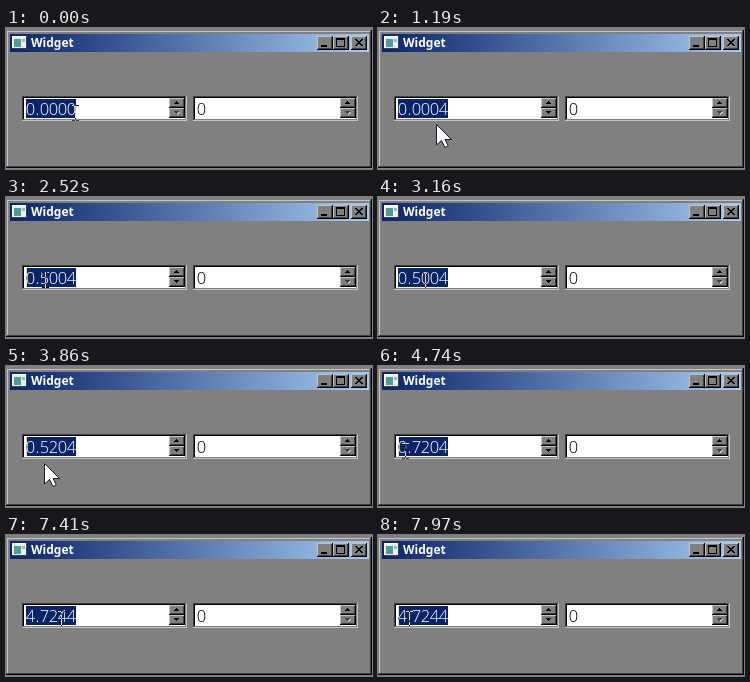
These frames come from a looping animation (366x141 px, 8000 ms). An HTML page with a canvas:

```html
<!DOCTYPE html>
<html lang="en">
<head>
<meta charset="utf-8">
<title>Widget</title>
<style>
html, body { margin: 0; width: 100%; height: 100%; overflow: hidden; background: #808080; }
canvas { display: block; }
</style>
</head>
<body>
<canvas id="stage" width="366" height="141"></canvas>
<script>
const ctx = document.getElementById('stage').getContext('2d');
const LOOP = 8000, TICK = 78.85;
const FACE = '#808080', LIGHT = '#c4c4c4', SHADOW = '#404040', BLACK = '#000', NAVY = '#0a246a';

// Pointer path: tick, x, y; linear in between.
const path = [
  [12, 69, 85], [13, 67, 89], [14, 63, 98], [15, 58, 96], [18, 46, 94], [20, 40, 86], [21, 39, 83],
  [33, 39, 83], [35, 43, 93], [37, 48, 94], [40, 47, 84],
  [46, 47, 84], [48, 40, 93], [49, 38, 97], [50, 36, 102], [52, 32, 98], [54, 29, 88], [55, 27, 85],
  [62, 27, 85], [64, 22, 84], [66, 22, 84], [67, 23, 85],
  [79, 23, 85], [80, 41, 85], [82, 53, 85], [83, 55, 84],
  [95, 55, 84], [97, 43, 98], [99, 34, 94], [101, 31, 84]
];

// Ticks at which the wheel raises each digit by one; '.' stays in place.
const wheel = [
  [68, 69, 75, 76], null, [24, 25, 29, 30, 32, 59, 60], [42, 43], [86, 87, 93, 94], [2, 3, 9, 10]
];

function rect(x, y, w, h, color) {
  ctx.fillStyle = color;
  ctx.fillRect(x, y, w, h);
}

function bevel(x, y, w, h, topLeft, bottomRight) {
  rect(x, y, w, 1, topLeft);
  rect(x, y, 1, h, topLeft);
  rect(x, y + h - 1, w, 1, bottomRight);
  rect(x + w - 1, y, 1, h, bottomRight);
}

function button(x, y, w, h) {
  rect(x, y, w, h, FACE);
  bevel(x, y, w, h, LIGHT, BLACK);
  rect(x + 1, y + h - 2, w - 2, 1, SHADOW);
  rect(x + w - 2, y + 1, 1, h - 2, SHADOW);
}

function triangle(x, y, up, color) {
  for (let i = 0; i < 3; i++) rect(x + i, up ? y + 2 - i : y + i, 5 - 2 * i, 1, color);
}

function text(str, x, y, font, color) {
  ctx.font = font;
  ctx.fillStyle = color;
  ctx.fillText(str, x, y);
}

function number(str, x, color) {
  ctx.textAlign = 'center';
  for (const ch of str) {
    const advance = ch === '.' ? 5 : 9;
    text(ch, x + advance / 2, 87, '300 16.5px "Open Sans", "Noto Sans", sans-serif', color);
    x += advance;
  }
  ctx.textAlign = 'left';
}

function spinBox(x, canStepDown) {
  rect(x, 68, 165, 25, '#fff');
  bevel(x, 68, 165, 25, SHADOW, LIGHT);
  bevel(x + 1, 69, 163, 23, BLACK, FACE);
  button(x + 147, 70, 16, 10);
  button(x + 147, 80, 16, 10);
  triangle(x + 152, 73, true, BLACK);
  if (!canStepDown) triangle(x + 153, 84, false, LIGHT);
  triangle(x + 152, 83, false, canStepDown ? BLACK : SHADOW);
}

function titleBar() {
  const fade = ctx.createLinearGradient(4, 0, 363, 0);
  fade.addColorStop(0, NAVY);
  fade.addColorStop(1, '#a6caf0');
  rect(4, 6, 359, 18, fade);

  rect(6, 8, 15, 13, '#e8f0f0');
  bevel(6, 8, 15, 13, '#fff', SHADOW);
  rect(8, 11, 7, 8, '#4f9a9a');
  rect(16, 11, 3, 3, '#9ab8c8');

  text('Widget', 25, 19, 'bold 12px "Noto Sans", "Open Sans", sans-serif', '#fff');

  for (const x of [311, 327, 345]) button(x, 8, 16, 14);
  rect(315, 17, 6, 2, BLACK);
  bevel(330, 10, 9, 9, BLACK, BLACK);
  rect(330, 11, 9, 1, BLACK);
  for (let i = 0; i < 7; i++) {
    rect(349 + i, 11 + i, 2, 1, BLACK);
    rect(355 - i, 11 + i, 2, 1, BLACK);
  }
}

function invert(...rects) {
  ctx.globalCompositeOperation = 'difference';
  for (const r of rects) rect(...r, '#fff');
  ctx.globalCompositeOperation = 'source-over';
}

function pointerAt(tick) {
  const next = path.findIndex(p => p[0] >= tick);
  if (next < 1) return path[next < 0 ? path.length - 1 : 0].slice(1);
  const [t0, x0, y0] = path[next - 1], [t1, x1, y1] = path[next];
  const k = (tick - t0) / (t1 - t0);
  return [Math.round(x0 + (x1 - x0) * k), Math.round(y0 + (y1 - y0) * k)];
}

function pointer(x, y) {
  if (y < 93) {
    invert([x - 3, y - 8, 3, 1], [x + 1, y - 8, 3, 1], [x, y - 7, 1, 14],
           [x - 3, y + 7, 3, 1], [x + 1, y + 7, 3, 1]);
    return;
  }
  const arrow = new Path2D(`M${x + .5} ${y + .5}v20.5l5-4.5 3.5 7 3.3-1.5-3.3-6.5h6.5z`);
  ctx.fillStyle = '#fff';
  ctx.fill(arrow);
  ctx.strokeStyle = '#181830';
  ctx.lineWidth = 1;
  ctx.stroke(arrow);
}

function draw(time) {
  const tick = Math.floor(time / TICK + .13);
  const value = wheel.map(ticks => ticks ? ticks.filter(t => t <= tick).length : '.').join('');

  rect(0, 0, 366, 141, FACE);
  bevel(0, 2, 366, 138, FACE, BLACK);
  bevel(1, 3, 364, 136, LIGHT, SHADOW);
  titleBar();

  spinBox(16, tick >= 2);
  rect(20, 71, 50, 19, NAVY);
  number(value, 20, '#fff');
  spinBox(187, false);
  number('0', 191, BLACK);

  const blinks = Math.floor((tick - 2.75) / 6.722) + 1;
  if (blinks % 2) invert([20, 71, 1, 19]);
  pointer(...pointerAt(tick));
}

function loop() {
  draw(performance.now() % LOOP);
  requestAnimationFrame(loop);
}
loop();
</script>
</body>
</html>
```
